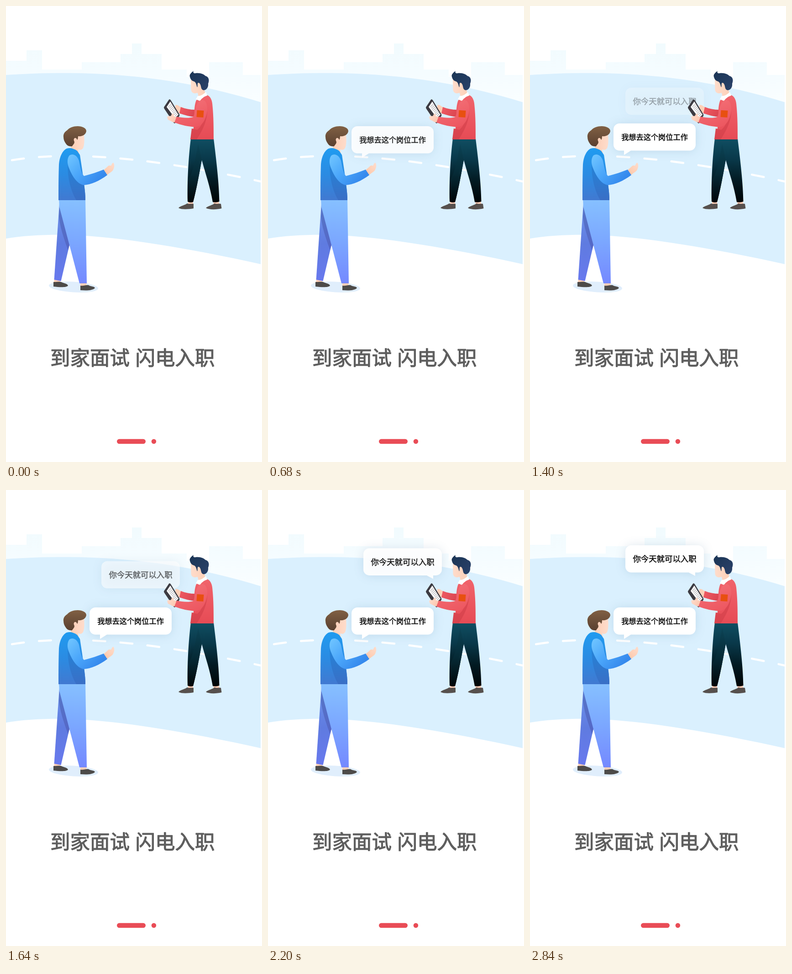
An HTML page with a canvas for the animation above (3360 ms loop, 561 by 998 pixels).

```html
<!DOCTYPE html>
<html lang="zh-CN">
<head>
<meta charset="utf-8">
<title>Interview scene</title>
<style>
  html, body { margin: 0; width: 100%; height: 100%; overflow: hidden; background: #fff; }
  canvas { display: block; width: 561px; height: 998px; }
</style>
</head>
<body>
<canvas id="stage" width="561" height="998"></canvas>
<script>
const ctx = document.getElementById('stage').getContext('2d');
const LOOP = 3360, STEP = 40;
const FONT = '"Noto Sans CJK SC", "Noto Sans CJK", "Noto Sans CJK JP", sans-serif';
const SKIN = '#fdd0b8', SKIN_LIGHT = '#fedccb';

// Linear gradient between two points, with evenly spaced colours.
function blend(x0, y0, x1, y1, ...colors) {
  const g = ctx.createLinearGradient(x0, y0, x1, y1);
  colors.forEach((c, i) => g.addColorStop(i / (colors.length - 1), c));
  return g;
}
const down = (y0, y1, ...colors) => blend(0, y0, 0, y1, ...colors);

function fill(path, paint) {
  ctx.fillStyle = paint;
  ctx.fill(new Path2D(path));
}

function stroke(path, paint, width) {
  ctx.strokeStyle = paint;
  ctx.lineWidth = width;
  ctx.stroke(new Path2D(path));
}

function text(str, x, y, size, color, weight) {
  ctx.font = `400 ${size}px ${FONT}`;
  ctx.textAlign = 'center';
  ctx.textBaseline = 'alphabetic';
  ctx.lineJoin = 'round';
  ctx.fillStyle = ctx.strokeStyle = color;
  ctx.lineWidth = weight;
  ctx.fillText(str, x, y);
  ctx.strokeText(str, x, y);
}

function drawBackdrop() {
  ctx.fillStyle = '#fff';
  ctx.fillRect(0, 0, 561, 998);
  fill('M0 120H45V97H79V139H166V123H251V105H276V82H297V105H341V139H396V155H445V123H519V151H558V230H0Z',
    down(82, 215, '#f1fbfe', '#f5fcff', '#fafeff'));
  fill('M0 151C55 147 110 146 160 147C300 150 430 171 558 210.5V565C400 530 250 505 140 501C90 500 40 502 0 509Z', '#daf0fe');
  ctx.save();
  ctx.beginPath();
  ctx.rect(0, 0, 558, 998);
  ctx.clip();
  ctx.lineCap = 'round';
  ctx.setLineDash([26.5, 33.1]);
  stroke('M13 337.5C110 322 260 319 558 384', '#fff', 4.5);
  ctx.restore();
}

function drawApplicant() {
  ctx.fillStyle = '#e0eefc';
  ctx.beginPath();
  ctx.ellipse(148, 615, 54, 11.5, 0.06, 0, Math.PI * 2);
  ctx.fill();

  // Feet
  fill('M106 596H119L118 607H105Z', SKIN);
  fill('M163 602H177L176 614H163Z', SKIN);
  fill('M104 604C112 604 117 603 121 604C126 607 134 607 136 612C133 616 120 616 104 614Z', '#4d4b49');
  fill('M163 612C170 613 176 610 181 611C185 614 193 613 195 617C190 623 176 623 163 622Z', '#4d4b49');

  // Trousers
  fill('M117 432L105.5 599L120.5 602L139 523L142 470Z', down(440, 600, '#6e93ea', '#5f7be0', '#6879ee'));
  fill('M117 438L139 523L136 534C126 507 118 483 116 460Z', down(440, 535, '#5676c8', '#5566c6'));
  fill('M116 424H174L177 607H161L139 523L117 440Z', down(424, 607, '#86c0ff', '#7ba7ff', '#7589ff'));

  // Head
  fill('M145 282L171 280C172 294 172 304 169 311C166 316 161 315 158 314L160 324L140 314L146 300Z',
    blend(145, 300, 171, 300, SKIN, SKIN_LIGHT));
  fill('M126 287C125 280 129 275 134 272C139 266 148 263 157 263C167 263 176 267 176 274C175 281 168 286 158 285C158 289 157 292 156 293C154 286 147 288 149 295C152 300 147 303 145 307C139 308 134 306 131 301C128 297 126 292 126 287Z',
    down(263, 307, '#806044', '#5a4030'));

  // Tunic
  fill('M133 312C124 316 117 330 116 347C115 375 115 400 115 425H174C174 405 169 372 162 326L156 317C147 311 140 310 133 312Z',
    down(312, 425, '#209bf0', '#2b8be2', '#4179d1'));
  fill('M136 338C133 365 139 400 154 425H174C174 412 172 395 169 380Z', down(345, 425, '#2384d8', '#3a6fc6'));

  // Hand and sleeve
  fill('M213 360L222 352C225 348 229 349 230 350C232 346 234 341 236 344C239 349 236 357 234 360C231 364 226 365 222 370Z',
    blend(215, 365, 237, 345, '#fdc9ac', SKIN_LIGHT));
  fill('M139 327C146 322 156 326 160 339C163 354 165 367 171 372C187 368 201 363 214 358L222 370C204 383 187 391 170 392C156 389 146 374 139 357C133 344 134 333 139 327Z',
    blend(140, 328, 200, 385, '#6dc3ff', '#4ba6fa', '#3589ed'));
}

function drawTablet() {
  fill('M357 205Q359 203 361 206L380 237Q381 240 379 242L371 256Q369 258 367 255L347 225Q345 222 347 220Z', '#3c3b42');
  fill('M360 209L378 238L370 245L352 221Z', '#fff');
  ctx.lineCap = 'butt';
  for (let i = 0; i < 8; i++) {
    const x = 355.5 + i * 2.1, y = 221 + i * 2.8;
    stroke(`M${x} ${y}l7 -6`, '#77777e', 0.9);
  }
}

function drawRecruiter() {
  // Feet
  fill('M399 426H409L411 435H399Z', SKIN);
  fill('M454 426H466L468 435H455Z', SKIN);
  fill('M378 442C382 437 393 436 397 432C401 434 406 432 411 433V443C400 445 385 446 378 442Z', '#56504d');
  fill('M438 442C443 437 453 436 457 432C462 434 467 432 471 433L472.5 443C460 446 445 446 438 442Z', '#56504d');

  // Trousers
  const cloth = down(290, 429, '#104e62', '#093849', '#021a22', '#000506');
  fill('M405 290H455C461 338 467 390 467.5 428Q460 431 453 429C447 394 438 370 429 337C423 370 417 403 410 429Q403 431 398 428C397 382 400 330 405 290Z', cloth);
  fill('M421 302C415 335 411 360 399 382L398 428Q403 431 410 429C417 403 423 370 429 337Z', down(302, 429, '#0c4355', '#062b37', '#000608'));

  // Head
  fill('M405 160L432 166L437 194L422 199L420 190C412 193 406 190 405.5 183Z',
    blend(406, 180, 437, 180, SKIN_LIGHT, SKIN));
  fill('M403 155C401 150 406 146 411 142C409 146 412 148 416 147C427 146 434 150 437 153C445 155 446 163 443 170C444 177 440 183 435 184C432 185 430 184 428 180C427 175 426 169 422 168C418 168 421 176 419 178C417 173 417 167 412 165C407 164 404 160 403 155Z',
    blend(403, 145, 443, 183, '#1b3555', '#2a4169'));

  // Far arm
  fill('M371 217C375 215 379 219 384 222L382 234C377 235 374 233 371 229Z', SKIN);
  fill('M383 221C393 225 404 227 414 227L416 243C403 242 392 239 380 235Z', blend(380, 225, 416, 240, '#ee5a62', '#d94450'));

  // Jumper and collar
  fill('M417 206C428 201 438 196 441 195C449 198 452 208 452.5 218C455 242 455 269 455 292H404C409 279 412 265 413 248C412 231 413 215 417 206Z',
    down(198, 292, '#f0636b', '#ec5760', '#e64b55'));
  fill('M438 222C438 242 430 263 419 271L407 268L404 292H418C431 272 442 250 441 225Z', down(225, 292, '#df4b55', '#d8434d'));
  fill('M416 204L420 197C428 197 434 192 438 188L441 196C434 198 428 203 425 208Z', '#fff');

  drawTablet();

  // Near arm and hand
  fill('M353 243C356 239 360 242 362 240C362 236 367 234 368 238L367 241L374 243L370 255C365 255 361 251 355 249Z',
    blend(353, 240, 374, 252, SKIN_LIGHT, '#fcc4ad'));
  fill('M425 207C436 202 442 213 441 228C439 246 431 264 415 265C400 264 385 261 369 255L374 242C387 245 401 246 410 243C415 237 414 215 425 207Z',
    blend(400, 210, 420, 265, '#f26d74', '#ed5760'));

  // Badge
  ctx.save();
  ctx.translate(425.5, 236);
  ctx.rotate(0.07);
  ctx.fillStyle = '#e85010';
  ctx.fillRect(-7.5, -7.5, 15, 15);
  ctx.restore();
}

const bubbles = [
  { str: '我想去这个岗位工作', size: 16.2, x: 183, y: 257, w: 180, tail: 'M206 314H225L206 326Z', start: 100, span: 1110, rise: 55 },
  { str: '你今天就可以入职', size: 17.4, x: 209, y: 121, w: 172, tail: 'M345 179H362V188Z', start: 1222, span: 1720, rise: 80 }
];

function drawBubble(b, time) {
  const p = Math.min(1, Math.max(0, (time - b.start) / b.span));
  const left = (1 - p) ** 3;
  if (left === 1) return;
  ctx.save();
  ctx.globalAlpha = 1 - left;
  ctx.translate(0, b.rise * left);
  const shape = new Path2D();
  shape.roundRect(b.x, b.y, b.w, 59.5, 13);
  shape.addPath(new Path2D(b.tail));
  ctx.save();
  ctx.shadowColor = 'rgba(90, 130, 165, 0.21)';
  ctx.shadowBlur = 22;
  ctx.shadowOffsetY = 1;
  ctx.fillStyle = '#fff';
  ctx.fill(shape);
  ctx.restore();
  text(b.str, b.x + b.w / 2, b.y + 30 + b.size * 0.37, b.size, '#0c0c0c', 0.5);
  ctx.restore();
}

function drawFooter() {
  text('到家面试', 184, 785.6, 43.5, '#5e5e5e', 1.2);
  text('闪电入职', 370.6, 785.6, 43.5, '#5e5e5e', 1.2);
  ctx.fillStyle = '#e94c56';
  ctx.beginPath();
  ctx.roundRect(243, 947.8, 63, 10.5, 5.25);
  ctx.roundRect(318.7, 947.8, 10.5, 10.5, 5.25);
  ctx.fill();
}

function frame(now) {
  const time = Math.floor((now % LOOP) / STEP) * STEP;
  drawBackdrop();
  bubbles.forEach(b => drawBubble(b, time));
  drawApplicant();
  drawRecruiter();
  drawFooter();
  requestAnimationFrame(() => frame(performance.now()));
}
frame(0);
</script>
</body>
</html>
```
